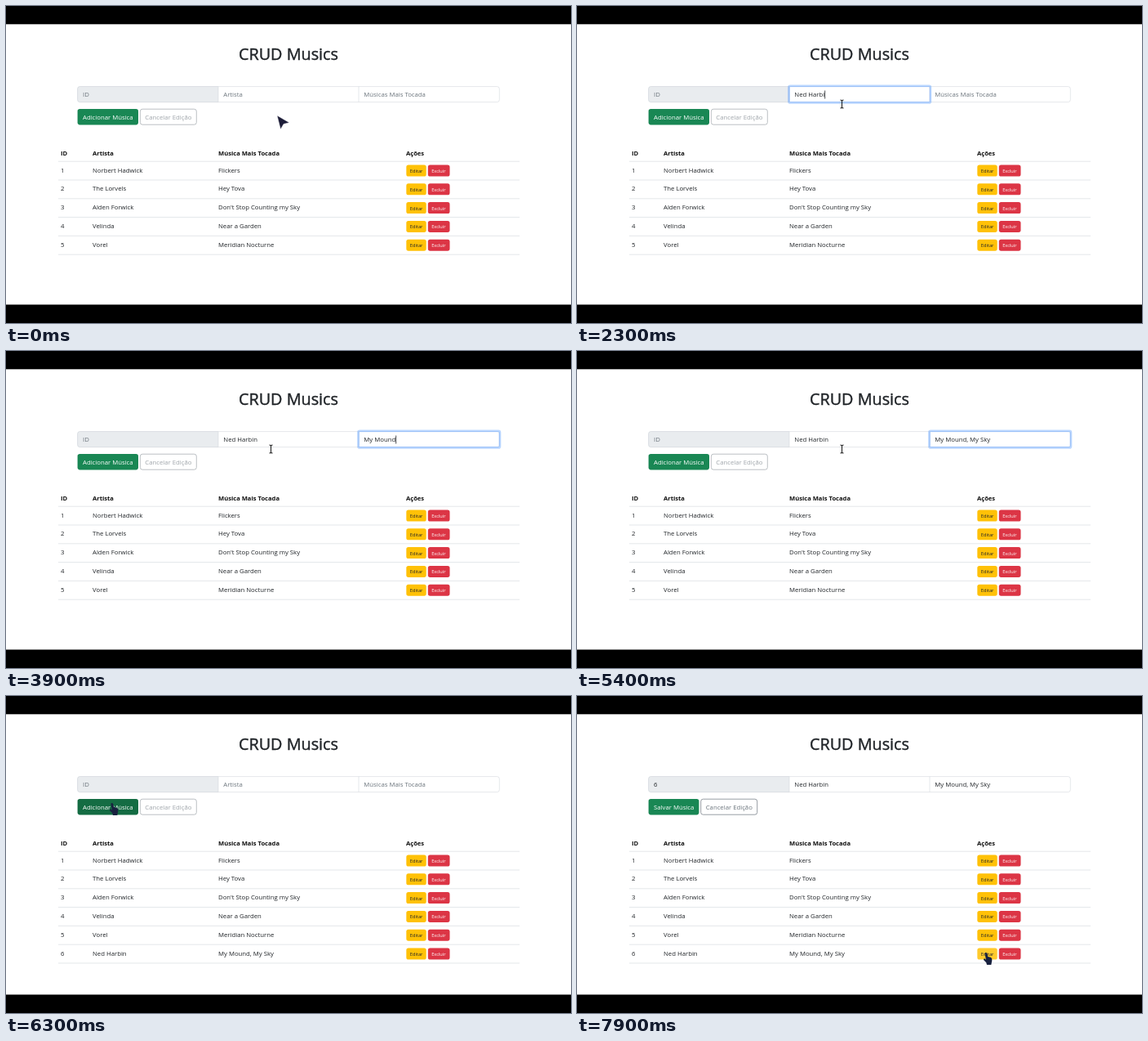
Animation, 692 px wide and 388 px high, one loop 8 s. Source, as an HTML page:

```html
<!DOCTYPE html>
<html lang="pt">
<head>
<meta charset="utf-8">
<title>CRUD Musics</title>
<style>
  html, body { margin: 0; height: 100%; overflow: hidden; background: #fff; }
  svg { display: block; width: 100vw; height: 100vh; }
  text { font: 7.75px "Open Sans", "Noto Sans", sans-serif; fill: #212529; white-space: pre; }
  .title { font-size: 19.8px; text-anchor: middle; stroke: #212529; stroke-width: .4; }
  .head { font-size: 7.6px; font-weight: 700; fill: #111; }
  .small { font-size: 5.7px; }
  .light { fill: #fff; }
  .empty { fill: #6c757d; }
  .line { stroke: #d9dde1; stroke-width: .7; }
  .field { stroke: #d3d8dd; stroke-width: .6; fill: #fff; }
  .outline { fill: none; stroke: #6c757d; stroke-width: .7; }
</style>
</head>
<body>
<svg id="stage" viewBox="0 0 692 388" preserveAspectRatio="none"></svg>
<script>
const LOOP = 8000, STEP = 100;
const ARTIST = "Ned Harbin", SONG = "My Mound, My Sky";
const ROWS = [
  ["Norbert Hadwick", "Flickers"],
  ["The Lorvels", "Hey Tova"],
  ["Alden Forwick", "Don't Stop Counting my Sky"],
  ["Velinda", "Near a Garden"],
  ["Vorel", "Meridian Nocturne"],
  [ARTIST, SONG]
];
const COLUMNS = [67, 106, 260, 490];
const PITCH = 22.8;

// Moment at which each character is typed
const ARTIST_KEYS = [900, 1000, 1200, 1400, 1600, 1700, 1800, 2100, 2200, 2400];
const SONG_KEYS = [2900, 3000, 3100, 3500, 3600, 3700, 3800, 3900, 4100, 4300, 4400, 4500, 4800, 4800, 5000, 5100];
const FOCUS_ARTIST = 500, FOCUS_SONG = 2500, ADDED = 6200, EDITING = 7800;

// Pointer path: time, x, y
const PATH = [
  [0, 332, 134], [200, 326, 120.5], [300, 324.5, 120], [5600, 324.5, 120],
  [5700, 290, 125], [5900, 150, 132], [6000, 129, 131], [6300, 129, 131],
  [6400, 132, 136], [6600, 170, 190], [6800, 228, 284], [7000, 253, 317],
  [7250, 370, 324], [7500, 508, 316], [7600, 500, 314], [8000, 500, 314]
];

const text = (x, y, str, cls = "", id = "") =>
  `<text x="${x}" y="${y}" class="${cls}" id="${id}">${str}</text>`;
const box = (x, y, w, h, r, attrs) =>
  `<rect x="${x}" y="${y}" width="${w}" height="${h}" rx="${r}" ${attrs}/>`;
const line = y => `<path class="line" d="M64 ${y}H629"/>`;

function row([artist, song], i) {
  const y = i * PITCH, base = 203.5 + y;
  return `<g id="row${i + 1}">` +
    [i + 1, artist, song].map((str, c) => text(COLUMNS[c], base, str)).join("") +
    box(490.3, 194.5 + y, 24.4, 14, 2.6, `fill="#ffc107" id="edit${i + 1}"`) +
    box(516.8, 194.5 + y, 26.7, 14, 2.6, 'fill="#dc3545"') +
    text(494.8, 204 + y, "Editar", "small") +
    text(521.2, 204 + y, "Excluir", "small light") +
    line(213 + y) + "</g>";
}

const stage = document.getElementById("stage");
stage.innerHTML =
  box(0, 0, 692, 388, 0, 'fill="#fff"') +
  box(0, 0, 692, 22.3, 0, "") +
  box(0, 365.5, 692, 22.5, 0, "") +
  text(346, 66, "CRUD Musics", "title") +
  box(87.7, 98.6, 516.6, 19, 2.8, 'class="field"') +
  '<path d="M260 98.6H90.5a2.8 2.8 0 0 0-2.8 2.8v13.4a2.8 2.8 0 0 0 2.8 2.8H260z" class="field" style="fill:#e9ecef"/>' +
  '<path class="field" d="M432 98.6v19"/>' +
  `<g id="ring" fill="none">${box(-1, 97.5, 174, 21.2, 2, 'stroke="#0d6efd" stroke-opacity=".27" stroke-width="2.2"')}
   ${box(0, 98.6, 172, 19, 1, 'stroke="#86b7fe" stroke-width=".7"')}</g>` +
  text(94, 111.2, "", "", "idField") +
  text(266.3, 111.2, "", "", "artistField") +
  text(438.3, 111.2, "", "", "songField") +
  '<path id="caret" stroke="#212529" stroke-width=".8" d="M0 103.5v10"/>' +
  box(87.6, 126, 74.4, 19.4, 2.8, 'id="submit"') +
  text(94, 138.6, "", "light", "submitLabel") +
  `<g id="cancel">${box(164.3, 126.2, 69, 19, 2.8, 'class="outline"')}
   ${text(170.3, 138.6, "Cancelar Edição", "empty")}</g>` +
  ["ID", "Artista", "Música Mais Tocada", "Ações"].map((str, c) => text(COLUMNS[c], 183, str, "head")).join("") +
  line(190.2) + ROWS.map(row).join("") +
  `<g id="pointer" stroke-linejoin="round">
    <path id="arrow" fill="#1d1d38" stroke="#fff" stroke-width=".5" d="M0 0L15 8.7L8 10.5L4.3 17Z"/>
    <path id="beam" fill="none" stroke="#222" stroke-width="1.1" d="M-2-5Q0-5 0-4Q0-5 2-5M0-4V4M-2 5Q0 5 0 4Q0 5 2 5"/>
    <path id="hand" fill="#18213f" d="M-.6 1Q.5-.8 1.9.6L3.3 5L7 6Q8.7 7 8.3 9.8L7.3 15H2L1.2 12.3L-2 9Q-2.2 7.2-.4 7.6L1 8.7Z"/>
  </g>`;

const el = id => document.getElementById(id);
const show = (id, on) => el(id).setAttribute("visibility", on ? "visible" : "hidden");
const move = (id, x, y = 0) => el(id).setAttribute("transform", `translate(${x} ${y})`);
const within = (t, from, to) => t >= from && t < to;

function fill(id, value, placeholder) {
  el(id).textContent = value || placeholder;
  el(id).setAttribute("class", value ? "" : "empty");
}

const ruler = document.createElement("canvas").getContext("2d");
function textWidth(str) {
  ruler.font = '7.75px "Open Sans", "Noto Sans", sans-serif';
  return ruler.measureText(str).width;
}

function typed(str, keys, t) {
  if (t >= EDITING) return str;
  if (t >= ADDED) return "";
  return str.slice(0, keys.filter(k => k <= t).length);
}

function pointerAt(t) {
  const i = PATH.findIndex(p => p[0] > t);
  const [t0, x0, y0] = PATH[i - 1], [t1, x1, y1] = PATH[i];
  const k = (t - t0) / (t1 - t0);
  return [x0 + (x1 - x0) * k, y0 + (y1 - y0) * k];
}

function render(t) {
  const editing = t >= EDITING;
  const artist = typed(ARTIST, ARTIST_KEYS, t), song = typed(SONG, SONG_KEYS, t);
  fill("idField", editing ? "6" : "", "ID");
  fill("artistField", artist, "Artista");
  fill("songField", song, "Músicas Mais Tocada");

  const onSong = t >= FOCUS_SONG;
  show("ring", within(t, FOCUS_ARTIST, ADDED));
  move("ring", onSong ? 432.2 : 260.2);
  show("caret", within(t, 700, FOCUS_SONG) || within(t, 2700, 5400));
  move("caret", onSong ? 438.8 + textWidth(song) : 266.8 + textWidth(artist));

  const [x, y] = pointerAt(t);
  const onSubmit = x < 162 && within(y, 126, 145.5);
  const onEdit = within(x, 490, 515) && within(y, 308, 323);
  const kind = y < 121 ? "beam" : onSubmit || onEdit ? "hand" : "arrow";
  move("pointer", x, y);
  for (const name of ["arrow", "beam", "hand"]) show(name, name === kind);

  el("submit").setAttribute("fill", onSubmit ? "#146c43" : "#198754");
  el("submit").setAttribute("width", editing ? 61.8 : 74.4);
  el("submitLabel").textContent = editing ? "Salvar Música" : "Adicionar Música";
  move("cancel", editing ? -12.6 : 0);
  el("cancel").setAttribute("opacity", editing ? 1 : .65);
  el("edit6").setAttribute("fill", onEdit ? "#ffca2c" : "#ffc107");
  el("row6").style.display = t >= ADDED ? "" : "none";
}

const start = performance.now();
function tick() {
  const t = (performance.now() - start) % LOOP;
  render(Math.floor(t / STEP) * STEP);
  requestAnimationFrame(tick);
}
tick();
</script>
</body>
</html>
```
